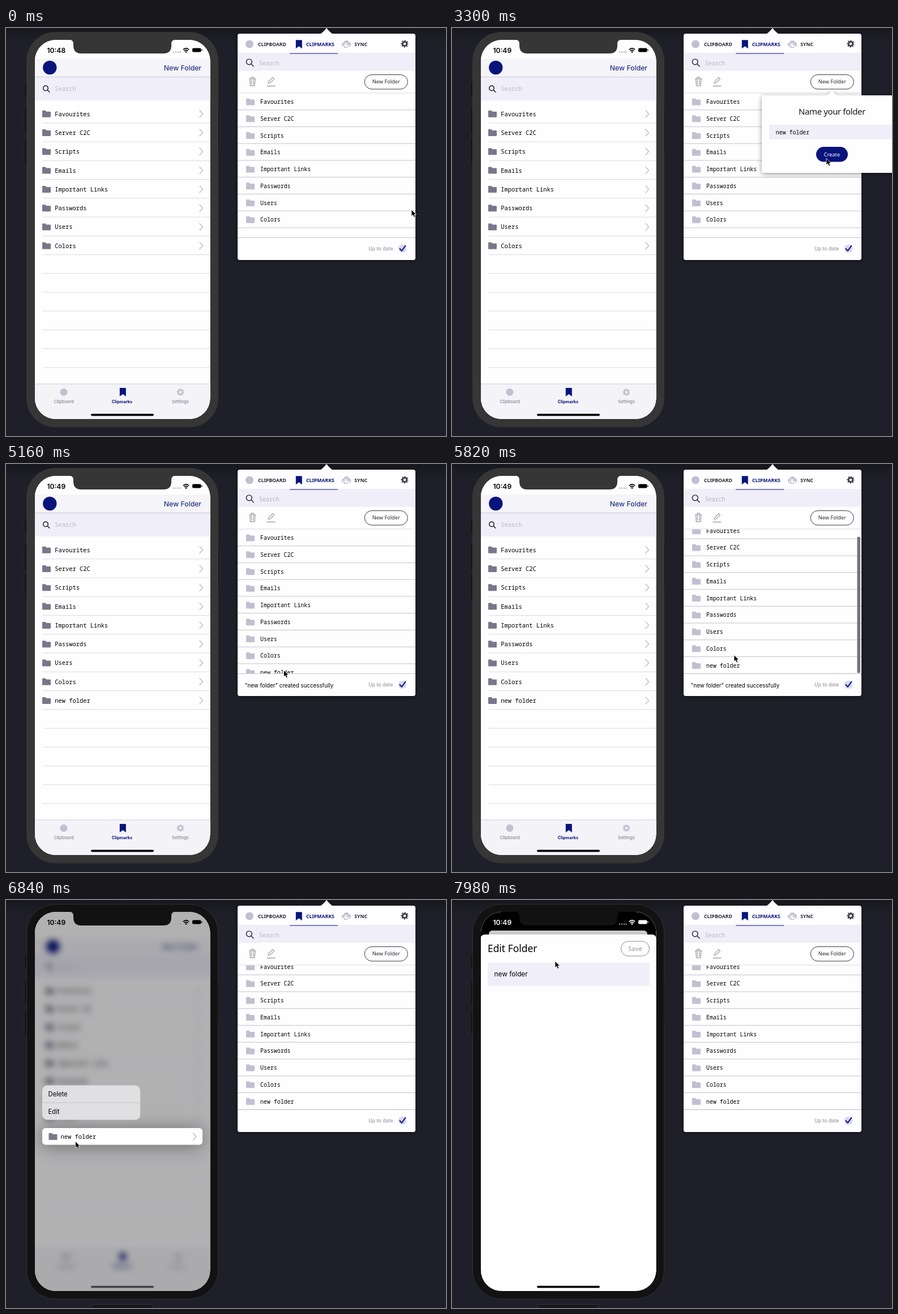
Recreate the animation shown at these times as an HTML page. Size 777x721 px, loop 8 s.

```html
<!DOCTYPE html>
<html lang="en">
<head>
<meta charset="utf-8">
<title>Folder sync</title>
<style>
  html, body { margin: 0; width: 100%; height: 100%; overflow: hidden; background: #1e1e28; }
  svg { display: block; width: 777px; height: 721px; }
  text { white-space: pre; }
  .mono { font-family: "Noto Sans Mono", monospace; }
  .ui { font-family: Inter, sans-serif; }
  .label { font-family: "Noto Sans", "Open Sans", sans-serif; }
  .line { fill: none; stroke-linecap: round; stroke-linejoin: round; }
</style>
</head>
<body>
<svg id="stage" viewBox="0 0 777 721"></svg>
<script>
const LOOP = 8000;
const NAVY = '#08147c', LILAC = '#efeef9', PALE = '#c0c0d0', SLATE = '#77778a', PAPER = '#fefdff';
const NAMES = ['Favourites', 'Server C2C', 'Scripts', 'Emails', 'Important Links', 'Passwords', 'Users', 'Colors', 'new folder'];

const rect = (x, y, w, h, fill, r = 0, extra = '') =>
  `<rect x="${x}" y="${y}" width="${w}" height="${h}" rx="${r}" fill="${fill}" ${extra}/>`;
const text = (x, y, size, cls, str, fill = '#000', extra = '') =>
  `<text x="${x}" y="${y}" font-size="${size}" class="${cls}" fill="${fill}" ${extra}>${str}</text>`;
const line = (d, stroke, width = 1, extra = '') =>
  `<path class="line" d="${d}" stroke="${stroke}" stroke-width="${width}" ${extra}/>`;
const rule = (x1, x2, y, color) => rect(x1, y - .5, x2 - x1, 1, color);
const dot = (x, y, r, fill) => `<circle cx="${x}" cy="${y}" r="${r}" fill="${fill}"/>`;
const group = (id, body, extra = '') => `<g id="${id}" ${extra}>${body}</g>`;

const folder = (x, y, fill) =>
  `<path transform="translate(${x} ${y})" d="M1 0H5.5L7.5 2H14Q15 2 15 3V11Q15 12 14 12H1Q0 12 0 11V1Q0 0 1 0Z" fill="${fill}"/>`;
const chevron = (x, y) => line(`M${x} ${y - 6}l5.5 6l-5.5 6`, '#bcbcc3', 1.4);
const glass = (x, y, r, w) =>
  line(`M${x - r} ${y}a${r} ${r} 0 1 1 ${2 * r} 0a${r} ${r} 0 1 1 ${-2 * r} 0M${x + r * .75} ${y + r * .75}l${r * .85} ${r * .85}`, '#25252d', w);
const bookmark = (x, y) =>
  `<path d="M${x} ${y}h10q1 0 1 1v14l-5.5-4l-5.5 4z" fill="${NAVY}"/>`;
const gear = (x, y, fill) => `<g fill="none" stroke="${fill}">
  <circle cx="${x}" cy="${y}" r="3.7" stroke-width="2.8"/>
  <circle cx="${x}" cy="${y}" r="5.6" stroke-width="2" stroke-dasharray="2.2 2.198" stroke-dashoffset="1.1"/></g>`;
const syncCloud = (x, y) => `<g transform="translate(${x} ${y})">
  <path d="M4 11Q0 11 0 7.3Q0 4 3.4 3.8Q4.5 0 8.4 0Q11.6 0 12.8 3.2Q16 3.4 16 7Q16 11 12.5 11Z" fill="${PALE}"/>
  ${dot(8, 9, 5.2, PAPER)}${line('M4.6 8.4a3.5 3.5 0 0 1 6.6-1M11.4 9.8a3.5 3.5 0 0 1-6.6 1M11.6 5.4v2.2h-2.2M4.4 12.8v-2.2h2.2', PALE, 1.3)}</g>`;

function phoneContent() {
  const rows = NAMES.map((name, i) => {
    const y = 151.7 + i * 33.3;
    const body = folder(64, y - 6, SLATE) + text(86.2, y + 3.9, 10.45, 'mono', name) + chevron(342, y);
    return i === 8 ? group('phoneNew', body) : body;
  }).join('');
  const rules = Array.from({ length: 14 }, (_, i) => rule(65, 360, 167.8 + i * 33.25, '#dbdbe0')).join('');
  return rect(20, 0, 370, 721, PAPER) + rect(20, 54, 370, 32.5, '#f5f4f8') + rule(20, 390, 86.5, '#cbcad2') +
    dot(77.3, 70, 12.2, NAVY) +
    text(345, 74.6, 12.3, 'ui', 'New Folder', NAVY, 'text-anchor="end"') +
    rect(20, 87, 370, 41, LILAC) + glass(70, 106.4, 4.3, 1.5) +
    text(86.2, 111, 10.45, 'mono', 'Search', '#bab9c3') + rules + rows +
    rect(20, 629, 370, 92, '#f4f3f7') + rule(20, 390, 629, '#d0cfd6') +
    dot(102, 643.5, 6.5, PALE) + bookmark(200.8, 636) + gear(308, 643.5, PALE) +
    [['Clipboard', 102, 500, '#85858f', 7.6], ['Clipmarks', 205, 700, NAVY, 7.3], ['Settings', 308, 500, '#85858f', 7.6]]
      .map(([s, x, w, c, size]) => text(x, 662.8, size, 'ui', s, c, `text-anchor="middle" font-weight="${w}"`)).join('');
}

function phone() {
  const buttons = [[32, 95, 26], [32, 142, 45], [32, 194, 45], [372, 142, 76]]
    .map(([x, y, h]) => rect(x, y, 5.5, h, '#17171a', 1.5, 'stroke="#2b2b2e"')).join('');
  const preview = group('preview',
    rect(64, 403, 283, 29.5, PAPER, 6, 'filter="url(#soft)"') + folder(75.5, 412, SLATE) +
    text(96.5, 421.8, 10.45, 'mono', 'new folder') + chevron(330.5, 418)) +
    group('menu', rect(64, 327.5, 173, 61, '#e0dfe2', 9) + rule(64, 237, 358, '#c3c2c7') +
      text(74.6, 347, 11.2, 'ui', 'Delete') + text(74.6, 377.8, 11.2, 'ui', 'Edit'));
  const sheet = group('sheet', rect(50, 61, 311, 700, PAPER, 8) +
    text(63, 92.4, 17.4, 'label', 'Edit Folder') +
    rect(298.5, 73, 50, 26, PAPER, 13, 'stroke="#8d8d93"') +
    text(323.5, 90, 10.45, 'mono', 'Save', '#8d8d93', 'text-anchor="middle"') +
    rect(63, 111, 285.5, 40.5, LILAC) + text(74.6, 135, 11.8, 'ui', 'new folder'));
  const status = group('status',
    text(88.8, 43.8, 12.1, 'ui', '', 'currentColor', 'id="clock" text-anchor="middle" font-weight="600"') +
    [296, 300, 304, 307.5].map(x => dot(x, 42.6, 1.2, '#a8a8ae')).join('') +
    line('M313.4 37.9q4.6-4 9.2 0M315.3 40.2q2.7-2.3 5.4 0', 'currentColor', 1.7) +
    dot(318, 42.4, 1.3, 'currentColor') +
    rect(329, 35.5, 15.5, 7, 'currentColor', 2) + rect(345.4, 37.5, 1.2, 3, 'currentColor', .6));
  return buttons + rect(36.5, 7.5, 338, 697.5, '#363636', 50, 'id="body"') +
    `<g clip-path="url(#screen)">` + rect(50, 20, 312, 672, PAPER) + group('content', phoneContent()) +
    rect(50, 20, 312, 672, '#000', 0, 'id="dim"') + preview +
    group('behind', rect(50, 20, 312, 672, '#000') + rect(65, 54, 280, 300, '#c9c9cb', 6)) +
    sheet + rect(150, 681.8, 111, 3.6, '#000', 1.8, 'id="home"') + '</g>' +
    `<path id="notch" d="M112 20.5Q119 21 119 28V31Q119 45 133 45H278Q292 45 292 31V28Q292 21 299 20.5Z" fill="#363636"/>` +
    status + rect(151, 714.5, 108, 20, '#17171b', 3, 'id="dock" stroke="#34343a"');
}

function panel() {
  const rows = NAMES.map((name, i) => {
    const y = 130.4 + i * 29.75;
    const body = folder(424, y - 6, PALE) + text(449, y + 3.6, 9.92, 'mono', name) + rule(409, 723, y + 14.3, '#c4c4ca');
    return i === 8 ? group('panelNew', body) : body;
  }).join('');
  const tab = (x, s, c) => text(x, 31.6, 8.7, 'label', s, c, 'font-weight="700"');
  return `<g filter="url(#shade)"><path d="M554 11Q559 9 566 0Q573 9 578 11Z" fill="${PAPER}"/>` + rect(409, 10, 314, 400, PAPER, 4) + '</g>' +
    dot(430, 28.5, 7, PALE) + tab(445, 'CLIPBOARD', '#292932') +
    bookmark(511.8, 21.3) + tab(530, 'CLIPMARKS', NAVY) +
    syncCloud(593, 22) + tab(615.3, 'SYNC', '#292932') + gear(704, 28, '#3e3e48') +
    rule(409, 723, 45, '#e0dfe7') + rect(409, 45.5, 314, 30, LILAC) + rule(501, 586, 45, NAVY) +
    glass(429.3, 59.8, 4.9, 1.4) + text(446.8, 65.5, 9.92, 'mono', 'Search', '#b3b2bd') +
    line('M429.5 90H441M433 89.5v-2.5h4.5v2.5M430.7 90.5l.7 11.5h7.7l.7-11.5M433.5 92.5v7M437 92.5v7', '#a5a5ac', 1.4) +
    line('M463 98l1-3.5l7-7l2.5 2.5l-7 7zM461 102.5h14', '#a5a5ac', 1.3) +
    rect(633.3, 82.5, 76, 25.5, PAPER, 12.75, 'stroke="#3a3a42"') +
    text(671.3, 98.4, 9.2, 'label', 'New Folder', '#2b2b33', 'text-anchor="middle" font-weight="500"') +
    rule(409, 723, 115, '#dedde4') +
    `<g clip-path="url(#list)">${group('rows', rows)}${rect(715.5, 116, 5.5, 241, '#747478', 2.75, 'id="thumb"')}</g>` +
    rule(409, 723, 370.5, '#c4c4ca') +
    text(422, 394.6, 9.75, 'ui', '"new folder" created successfully', '#000', 'id="message"') +
    text(640, 393, 8.8, 'label', 'Up to date', '#85858c') +
    dot(700, 390, 7.3, '#d6d8f4') + line('M695.5 390l3.3 3.8l6.5-9', NAVY, 2);
}

const popover = () => group('popover',
  `<g filter="url(#shade)"><path d="M660 119.5Q665 118 671 110.5Q677 118 682 119.5Z" fill="${PAPER}"/>` +
  rect(547, 119, 248, 137, PAPER, 4) + '</g>' +
  text(671, 153, 15, 'label', 'Name your folder', '#17171c', 'text-anchor="middle" letter-spacing="-.4"') +
  rect(560, 171, 230, 25.5, LILAC) + text(571.8, 187.6, 9.92, 'mono', '', '#000', 'id="typed"') +
  rect(0, 177.5, 1, 13, '#000', 0, 'id="caret"') +
  rect(643, 210, 56, 26.5, NAVY, 13.25, 'id="create"') +
  text(671, 226.6, 9.2, 'label', 'Create', '#fff', 'text-anchor="middle" font-weight="500"'));

document.getElementById('stage').innerHTML = `<defs>
  <linearGradient id="sky" x2="0" y2="1"><stop offset="0" stop-color="#17181e"/><stop offset="1" stop-color="#1f1f29"/></linearGradient>
  <clipPath id="screen">${rect(51, 21, 309.5, 670, '#000', 37)}</clipPath>
  <clipPath id="list">${rect(409, 115.5, 314, 254.5, '#000')}</clipPath>
  <filter id="shade" x="-20%" y="-20%" width="140%" height="140%"><feDropShadow dx="0" dy="2" stdDeviation="4" flood-opacity=".4"/></filter>
  <filter id="soft" x="-20%" y="-200%" width="140%" height="500%"><feDropShadow dx="0" dy="3" stdDeviation="16" flood-opacity=".4"/></filter>
  </defs>` + rect(0, 0, 777, 721, '#1f1f29') + rect(0, 0, 777, 28, 'url(#sky)') +
  phone() + panel() + popover() +
  group('cursor', '<path d="M0 0V11.6L2.7 9.2L4.6 13.4L6.8 12.4L5 8.4H8.6Z" fill="#000" stroke="#fff" stroke-width=".8"/>');

const el = {};
document.querySelectorAll('#stage [id]').forEach(node => el[node.id] = node);

// Each track is a list of [ms, value] points joined by smooth easing.
function at(t, points) {
  let prev = points[0];
  for (const next of points) {
    if (t < next[0]) {
      const p = Math.max(0, (t - prev[0]) / (next[0] - prev[0] || 1));
      return prev[1] + (next[1] - prev[1]) * p * p * (3 - 2 * p);
    }
    prev = next;
  }
  return prev[1];
}
const ramp = (t, from, to) => at(t, [[from, 0], [to, 1]]);

// Pointer stops: arrive, leave, x, y.
const STOPS = [
  [0, 120, 716, 321], [780, 2700, 687.5, 95.5], [3150, 4300, 661, 230.5], [4950, 5200, 490.5, 364.5],
  [5500, 5840, 498, 337.5], [6180, 6860, 122.5, 426.5], [7120, 7320, 92, 374], [7860, 8000, 182, 108]
];
const path = axis => STOPS.flatMap(s => [[s[0], s[axis]], [s[1], s[axis]]]);
const pathX = path(2), pathY = path(3);

const show = (node, alpha) => node.setAttribute('opacity', alpha);
const grey = v => `rgb(${v},${v},${v})`;

function render(t) {
  el.cursor.setAttribute('transform', `translate(${at(t, pathX)} ${at(t, pathY)})`);
  el.clock.textContent = t < 600 ? '10:48' : '10:49';

  show(el.popover, ramp(t, 1000, 1120) - ramp(t, 4140, 4340));
  const count = t < 1780 ? 0 : Math.min(10, 1 + Math.floor((t - 1780) / 90));
  el.typed.textContent = 'new folder'.slice(0, count);
  el.caret.setAttribute('x', 572 + count * 5.95);
  show(el.caret, t < 2960 ? 1 : 0);
  show(el.create, .45 + .55 * ramp(t, 1800, 1980));

  show(el.panelNew, t >= 4300 ? 1 : 0);
  show(el.phoneNew, ramp(t, 4400, 4560));
  show(el.message, t >= 4300 && t < 6540 ? 1 : 0);
  const scroll = 12.4 * ramp(t, 5260, 5640);
  el.rows.setAttribute('transform', `translate(0 ${-scroll})`);
  el.thumb.setAttribute('y', 116 + scroll);
  show(el.thumb, ramp(t, 5240, 5300) - ramp(t, 6100, 6340));

  const active = t >= 6120;
  el.body.setAttribute('fill', active ? '#121213' : '#363636');
  el.body.setAttribute('stroke', active ? '#303032' : '#363636');
  el.notch.setAttribute('fill', active ? '#121213' : '#363636');
  show(el.dock, t >= 5920 ? 1 : 0);

  const focus = ramp(t, 6360, 6700) - ramp(t, 7330, 7540);
  const scale = 1 - .043 * focus;
  el.content.setAttribute('transform', `translate(205.5 356) scale(${scale}) translate(-205.5 -356)`);
  el.content.style.filter = focus > 0 ? `blur(${6 * focus}px)` : 'none';
  show(el.dim, .3 * focus);
  show(el.preview, ramp(t, 6380, 6560) - ramp(t, 7380, 7540));
  const pop = ramp(t, 6540, 6760) - ramp(t, 7330, 7480);
  show(el.menu, pop);
  el.menu.setAttribute('transform', `translate(90 395) scale(${.3 + .7 * pop}) translate(-90 -395)`);
  show(el.home, 1 - .4 * focus);

  const rise = ramp(t, 7440, 7820);
  show(el.behind, rise);
  el.sheet.setAttribute('transform', `translate(0 ${640 * (1 - rise)})`);
  el.status.setAttribute('color', grey(Math.round(255 * rise)));
}

const start = performance.now();
function frame() {
  render((performance.now() - start) % LOOP);
  requestAnimationFrame(frame);
}
frame();
</script>
</body>
</html>
```
